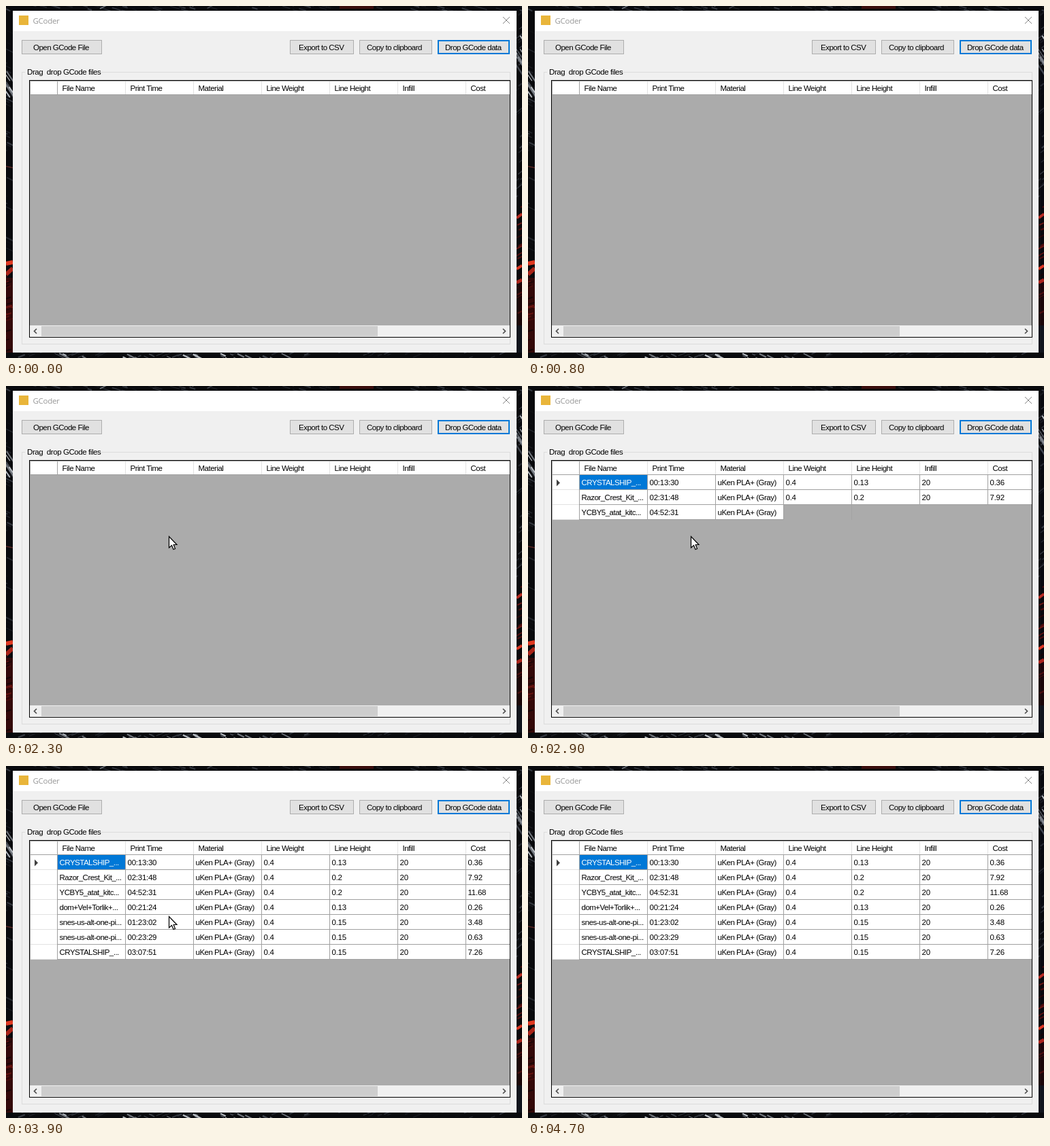
Write an HTML page with a canvas that moves like this. It is 758x518 px and loops after 4.9 s.

```html
<!DOCTYPE html>
<html lang="en">
<head>
<meta charset="utf-8">
<title>GCoder</title>
<style>
  html, body { margin: 0; width: 100%; height: 100%; overflow: hidden; background: #08080b; }
  canvas { display: block; }
</style>
</head>
<body>
<canvas id="stage" width="758" height="518"></canvas>
<script>
const ctx = document.getElementById('stage').getContext('2d');
const LOOP = 4900, STEP = 100;
const UI_FONT = '11.5px "Liberation Sans", Arial, sans-serif';
const TITLE_FONT = '11.5px "Open Sans", sans-serif';
const BLUE = '#0078d7', GRID = '#a0a0a0', FACE = '#f0f0f0';
const COLUMNS = ['File Name', 'Print Time', 'Material', 'Line Weight', 'Line Height', 'Infill', 'Cost'];
const MATERIAL = 'uKen PLA+ (Gray)';
const ROWS = [
  ['CRYSTALSHIP_...', '00:13:30', '0.13', '0.36'],
  ['Razor_Crest_Kit_...', '02:31:48', '0.2', '7.92'],
  ['YCBY5_atat_kitc...', '04:52:31', '0.2', '11.68'],
  ['dom+Vel+Torlik+...', '00:21:24', '0.13', '0.26'],
  ['snes-us-alt-one-pi...', '01:23:02', '0.15', '3.48'],
  ['snes-us-alt-one-pi...', '00:23:29', '0.15', '0.63'],
  ['CRYSTALSHIP_...', '03:07:51', '0.15', '7.26'],
].map(([name, time, height, cost]) => [name, time, MATERIAL, '0.4', height, '20', cost]);

const clamp = (v, lo, hi) => Math.min(hi, Math.max(lo, v));
const columnX = i => 75 + i * 100;

function rect(x, y, w, h, fill) {
  ctx.fillStyle = fill;
  ctx.fillRect(x, y, w, h);
}

function frame(x, y, w, h, color, width = 1) {
  ctx.strokeStyle = color;
  ctx.lineWidth = width;
  ctx.strokeRect(x + width / 2, y + width / 2, w - width, h - width);
}

function text(str, x, y, color = '#000', spacing = -0.5, font = UI_FONT) {
  ctx.font = font;
  ctx.letterSpacing = spacing + 'px';
  ctx.fillStyle = color;
  ctx.fillText(str, x, y);
}

function path(points, color, width = 1) {
  ctx.beginPath();
  points.forEach(([x, y]) => ctx.lineTo(x, y));
  ctx.strokeStyle = color;
  ctx.lineWidth = width;
  ctx.stroke();
}

function button(label, x, w, textX, focused) {
  rect(x, 50, w, 21, '#e1e1e1');
  frame(x, 50, w, 21, focused ? BLUE : '#adadad', focused ? 2 : 1);
  text(label, textX, 65);
}

// Wallpaper slivers around the window: dark tones under seeded diagonal streaks
function drawWallpaper() {
  let seed = 11;
  const random = () => (seed = seed * 16807 % 2147483647) / 2147483647;
  const streaks = (count, x, y, w, h, colors, slope) => {
    for (let i = 0; i < count; i++) {
      const px = x + random() * w, py = y + random() * h, len = 4 + random() * 12;
      path([[px, py], [px + len, py + len * slope]],
        colors[Math.floor(random() * colors.length)], 1 + random() * 1.5);
    }
  };
  const grays = ['#191b20', '#24272d', '#33373e', '#0d0e11'];
  const lights = ['#b9bec3', '#70757c', '#41454d'];
  const reds = ['#2c0808', '#4a0d0c', '#6e1612', '#160506'];

  rect(0, 0, 758, 518, '#090a0d');
  rect(0, 400, 10, 110, '#330909');
  rect(750, 410, 8, 60, '#1c0708');
  rect(750, 470, 8, 40, '#10141c');
  streaks(40, -8, 0, 10, 365, grays, 0.5);
  streaks(8, -8, 82, 10, 38, lights, 1.5);
  streaks(22, -8, 400, 10, 110, reds, -0.3);
  streaks(40, 746, 10, 10, 280, grays, -0.8);
  streaks(10, 746, 25, 10, 60, lights, 1.5);
  streaks(22, 746, 290, 10, 180, reds, -0.5);
  streaks(70, 0, -3, 758, 9, grays, 0.3);
  streaks(8, 40, -3, 460, 8, lights, -0.5);
  rect(490, 0, 50, 4, '#3a0d0d');
  streaks(70, 0, 509, 758, 9, grays, -0.4);
  streaks(28, 60, 511, 400, 7, lights, 0.5);
  path([[0, 236], [10, 238]], '#5a2523', 1.5);
  path([[0, 379], [10, 377]], '#e03a22', 6);
  path([[0, 395], [10, 386]], '#a82418', 6);
  path([[750, 312], [758, 306]], '#b52b20', 4);
  path([[750, 387], [758, 382]], '#dc3721', 4);
  path([[750, 407], [758, 403]], '#a9251b', 5);
}

function drawWindow() {
  rect(10, 7, 740, 503, FACE);
  rect(10, 7, 740, 30, '#fff');
  rect(19, 14, 14, 14, '#e9b53a');
  text('GCoder', 39.5, 26, '#999', -0.3, TITLE_FONT);
  path([[730, 16], [740, 26]], '#858585');
  path([[740, 16], [730, 26]], '#858585');

  button('Open GCode File', 23, 118, 40);
  button('Export to CSV', 417, 94, 430);
  button('Copy to clipboard', 519, 107, 530);
  button('Drop GCode data', 634, 106, 645, true);

  frame(23, 97, 718, 401, '#dcdcdc');
  rect(28, 96, 112, 3, FACE);
  text('Drag  drop GCode files', 31, 101, '#000', -0.42);

  rect(34, 109, 707, 379, '#ababab');
  rect(36, 111, 704, 19, '#fff');
  rect(36, 130, 704, 1, GRID);
  COLUMNS.forEach((label, i) => {
    rect(columnX(i), 111, 1, 19, i ? '#e2e2e2' : GRID);
    text(label, columnX(i) + 7.5, 125);
  });

  rect(35, 470, 705, 17, FACE);
  rect(52, 471, 494, 15, '#cdcdcd');
  path([[45, 475], [41.5, 478.5], [45, 482]], '#505050', 1.7);
  path([[730, 475], [733.5, 478.5], [730, 482]], '#505050', 1.7);
  frame(34, 109, 707, 379, '#000');
}

function drawRow(cells, index, columns) {
  const top = 131 + index * 22, right = columns < 7 ? columnX(columns) + 1 : 740;
  rect(36, top, right - 36, 21, '#fff');
  rect(36, top + 21, 39, 1, '#e2e2e2');
  rect(75, top + 21, right - 75, 1, GRID);
  for (let i = 0; i <= columns && i < 7; i++) rect(columnX(i), top, 1, 22, GRID);
  cells.slice(0, columns).forEach((cell, i) => {
    const selected = index === 0 && i === 0;
    if (selected) rect(76, top, 99, 21, BLUE);
    const spacing = /^[\d.:]+$/.test(cell) ? -0.25 : -0.5;
    text(cell, columnX(i) + 3.5, top + 15, selected ? '#fff' : '#000', spacing);
  });
}

function drawRows(step) {
  if (step < 29) return;
  const painting = step === 29;
  ROWS.slice(0, painting ? 3 : 7).forEach((cells, i) => drawRow(cells, i, painting && i === 2 ? 3 : 7));
  if (painting) rect(475, 175, 1, 22, '#a3a3a3');
  ctx.fillStyle = '#404040';
  ctx.beginPath();
  ctx.moveTo(42, 137.5);
  ctx.lineTo(47, 142.5);
  ctx.lineTo(42, 147.5);
  ctx.fill();
}

function drawCursor(step) {
  const entered = (clamp(step - 13, 0, 4) + clamp(step - 18, 0, 3)) / 7;
  const left = clamp(step - 39, 0, 4) / 4;
  if (entered === 0 || left === 1) return;
  const away = (1 - entered) ** 2 + left ** 2;
  ctx.save();
  ctx.translate(Math.round(239 + 520 * away) + 0.5, Math.round(221 + 60 * away) + 0.5);
  ctx.beginPath();
  [[0, 0], [0, 16.5], [4, 13], [6.5, 19], [9, 18], [6.7, 12], [11.5, 12]]
    .forEach(([x, y]) => ctx.lineTo(x, y));
  ctx.closePath();
  ctx.fillStyle = '#fff';
  ctx.fill();
  ctx.strokeStyle = '#000';
  ctx.lineWidth = 1.2;
  ctx.stroke();
  ctx.restore();
}

function render() {
  const step = Math.floor(performance.now() % LOOP / STEP);
  drawWallpaper();
  drawWindow();
  drawRows(step);
  drawCursor(step);
  requestAnimationFrame(render);
}
render();
</script>
</body>
</html>
```
